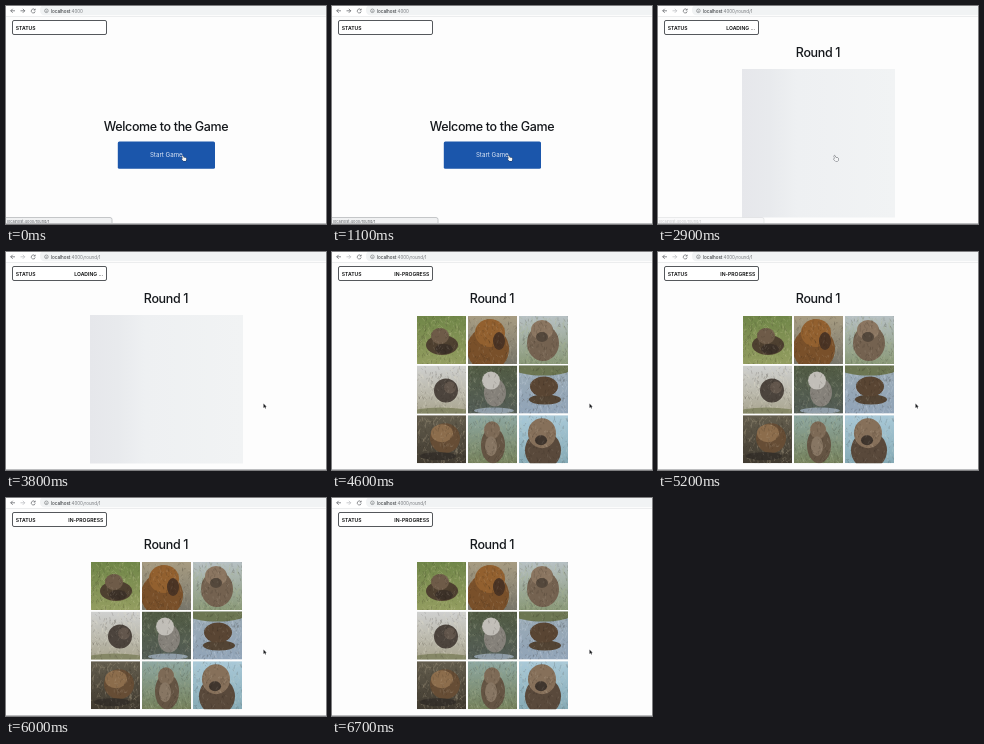
Write an HTML page with a canvas that moves like this. It is 320 px wide and 218 px high and loops after 6.8 s.

```html
<!DOCTYPE html>
<html lang="en">
<head>
<meta charset="utf-8">
<title>Welcome to the Game</title>
<style>
  html, body { margin: 0; width: 100%; height: 100%; overflow: hidden; background: #fdfdfd; }
  canvas { display: block; width: 320px; height: 218px; }
</style>
</head>
<body>
<canvas id="stage"></canvas>
<script>
const W = 320, H = 218, LOOP = 6800;
const PAGE_AT = 2500, PHOTOS_AT = 4600;
const dpr = window.devicePixelRatio || 1;

function scaled(canvas, scale) {
  canvas.width = W * scale;
  canvas.height = H * scale;
  const c = canvas.getContext('2d');
  c.scale(scale, scale);
  return c;
}

const ctx = scaled(document.getElementById('stage'), dpr);

function text(str, x, y, size, color, weight = 400, align = 'left') {
  ctx.font = `${weight} ${size}px Inter, "Liberation Sans", sans-serif`;
  ctx.fillStyle = color;
  ctx.textAlign = align;
  ctx.fillText(str, x, y);
  return ctx.measureText(str).width;
}

function heading(str, y) {
  ctx.letterSpacing = '-0.35px';
  text(str, 160, y, 12.5, '#15181c', 500, 'center');
  ctx.letterSpacing = '0px';
}

function box(x, y, w, h, r, fill, stroke) {
  ctx.beginPath();
  ctx.roundRect(x, y, w, h, r);
  if (fill) { ctx.fillStyle = fill; ctx.fill(); }
  if (stroke) { ctx.strokeStyle = stroke; ctx.lineWidth = 1; ctx.stroke(); }
}

function path(d, color, width = 0.7) {
  ctx.strokeStyle = color;
  ctx.lineWidth = width;
  ctx.stroke(new Path2D(d));
}

// Photo tiles: sky, ground, texture colour, then blobs [color, x, y, rx, ry]
const tiles = [
  { sky: '#708648', ground: '#939d60', blade: '#b4bc84', blobs: [
    ['#4e4030', 25, 29, 16, 10], ['#6e5b48', 23, 20, 9, 8], ['#3c3128', 27, 33, 9, 5]] },
  { sky: '#a79c82', ground: '#77756a', blade: '#a29c88', blobs: [
    ['#79502a', 20, 33, 21, 22], ['#92602f', 22, 17, 15, 14], ['#4b3424', 31, 25, 6, 9]] },
  { sky: '#b7c1c4', ground: '#899877', blade: '#a7b28b', blobs: [
    ['#746250', 24, 27, 16, 18], ['#8b7661', 23, 14, 11, 10], ['#54483c', 23, 21, 6, 5]] },
  { sky: '#cfd0cf', ground: '#a9a58f', blade: '#dad6c9', blobs: [
    ['#858766', 24, 47, 30, 5], ['#4c443d', 29, 25, 12, 12], ['#62564c', 33, 22, 6, 6]] },
  { sky: '#515b43', ground: '#545d57', blade: '#899179', blobs: [
    ['#85817a', 27, 27, 11, 14], ['#c1beb8', 23, 15, 9, 9], ['#8f9da8', 26, 45, 20, 3]] },
  { sky: '#9aaab4', ground: '#91a4b8', blade: '#bdcbd9', blobs: [
    ['#6c7652', 24, 2, 30, 8], ['#534434', 26, 34, 16, 5], ['#594533', 25, 21, 14, 10]] },
  { sky: '#635d4d', ground: '#403a30', blade: '#a69983', blobs: [
    ['#664d35', 28, 23, 15, 15], ['#8c6d4c', 25, 18, 11, 9], ['#35302a', 21, 41, 18, 4]] },
  { sky: '#8ea8a2', ground: '#74805a', blade: '#9eaa87', blobs: [
    ['#645443', 25, 30, 12, 18], ['#7d6a56', 24, 15, 8, 9], ['#877663', 23, 31, 6, 10]] },
  { sky: '#a9c9d8', ground: '#86aab5', blade: '#b5cccb', blobs: [
    ['#59493b', 24, 35, 18, 19], ['#86705a', 23, 18, 14, 15], ['#40362e', 22, 25, 6, 5]] }
];

function rng(seed) {
  return () => (seed = (seed * 16807) % 2147483647) / 2147483647;
}

function drawTile(c, tile, i) {
  const w = 49, h = 48, rand = rng(91 + i * 577);
  const streaks = (n, color, alpha, len) => {
    c.strokeStyle = color;
    c.globalAlpha = alpha;
    c.lineWidth = 0.6;
    for (let k = 0; k < n; k++) {
      const x = rand() * w, y = rand() * h;
      c.beginPath();
      c.moveTo(x, y);
      c.lineTo(x + (rand() - 0.5) * len, y + rand() * len);
      c.stroke();
    }
    c.globalAlpha = 1;
  };
  c.save();
  c.translate(85 + (i % 3) * 51, 64 + Math.floor(i / 3) * 49.6);
  c.beginPath();
  c.rect(0, 0, w, h);
  c.clip();
  const bg = c.createLinearGradient(0, 0, 0, h);
  bg.addColorStop(0, tile.sky);
  bg.addColorStop(1, tile.ground);
  c.fillStyle = bg;
  c.fillRect(0, 0, w, h);
  streaks(110, tile.blade, 0.55, 6);
  for (const [color, x, y, rx, ry] of tile.blobs) {
    c.fillStyle = color;
    c.beginPath();
    c.ellipse(x, y, rx, ry, 0, 0, Math.PI * 2);
    c.fill();
  }
  streaks(120, '#241d18', 0.25, 4);
  streaks(80, '#e5dccb', 0.18, 4);
  c.restore();
}

const photos = document.createElement('canvas');
const photoCtx = scaled(photos, dpr);
tiles.forEach((tile, i) => drawTile(photoCtx, tile, i));

function toolbar(onRound) {
  ctx.fillStyle = '#fff';
  ctx.fillRect(0, 0, W, 10);
  box(34, -1, 300, 10.2, 4.5, '#f1f3f4');
  ctx.fillStyle = '#e6e7e9';
  ctx.fillRect(0, 10, W, 0.7);
  path('M9 4.8H4.7M6.7 2.8L4.7 4.8L6.7 6.8', '#55585c');
  path('M14.5 4.8H18.8M16.8 2.8L18.8 4.8L16.8 6.8', onRound ? '#b5b7ba' : '#55585c');
  path('M28.8 3.7A2 2 0 1 0 29.2 5.4M29.2 2.7V4.1H27.7', '#606367');
  path('M38.6 4.8a1.8 1.8 0 1 0 3.6 0a1.8 1.8 0 1 0 -3.6 0M40.4 4.5V5.8', '#606367', 0.55);
  const w = text('localhost', 45, 6.5, 4.5, '#202327');
  text(onRound ? ':4000/round/1' : ':4000', 45 + w, 6.5, 4.5, '#74777b');
}

function status(label) {
  box(6.5, 14.5, 94, 14, 1.5, '#fff', '#55585c');
  text('STATUS', 9.7, 23.6, 5.1, '#08090a', 600);
  text(label, 97.3, 23.6, 5.1, '#08090a', 600, 'right');
}

function linkHint(alpha) {
  if (alpha <= 0) return;
  ctx.globalAlpha = alpha;
  box(-2, 211.5, 108, 9, 2, '#f0f1f2', '#c4c6c8');
  text('localhost:4000/round/1', 1, 216.5, 3.85, '#606367');
  ctx.globalAlpha = 1;
}

function welcome() {
  heading('Welcome to the Game', 125.3);
  box(111.8, 135.4, 97.2, 27.4, 1.6, '#1b56ab');
  text('Start Game', 160.3, 151.3, 6.2, '#dce6f5', 400, 'center');
}

function skeleton() {
  const g = ctx.createLinearGradient(84, 0, 237, 0);
  g.addColorStop(0, '#e6e7eb');
  g.addColorStop(0.18, '#e8eaed');
  g.addColorStop(0.36, '#eef0f2');
  g.addColorStop(1, '#f1f3f4');
  ctx.fillStyle = g;
  ctx.fillRect(84, 63, 153, 148.5);
}

function pointer(shape, x, y, fill, stroke) {
  ctx.save();
  ctx.translate(x, y);
  const p = new Path2D(shape);
  ctx.lineJoin = 'round';
  ctx.lineWidth = 0.7;
  ctx.strokeStyle = stroke;
  ctx.stroke(p);
  ctx.fillStyle = fill;
  ctx.fill(p);
  ctx.restore();
}

const HAND = 'M0 .4Q.7 -.4 1.2 .5L1.7 2L3.8 2.4Q4.5 2.8 4.3 4L3.8 5.6H1.4L-.4 3.6Q-.3 2.9 .7 3.3Z';
const ARROW = 'M0 0V4.4L1 3.5L1.7 5.1L2.5 4.7L1.8 3.2H3.1Z';

function cursor(t) {
  if (t < 3400) {
    pointer(HAND, 176, 149.4, '#f4f5f6', '#20252c');
    return;
  }
  const step = Math.min(5, Math.floor((t - 3400) / 100) + 1) / 5;
  const p = step * step * (3 - 2 * step);
  pointer(ARROW, 176.5 + 81 * p, 149.8 + 1.7 * p, '#202124', '#fff');
}

function clickRing() {
  ctx.beginPath();
  ctx.arc(176.5, 150.3, 9.8, 0, Math.PI * 2);
  ctx.fillStyle = 'rgba(90, 100, 120, .18)';
  ctx.fill();
  ctx.strokeStyle = 'rgba(125, 126, 118, .75)';
  ctx.lineWidth = 1;
  ctx.setLineDash([1.6, 0.8]);
  ctx.stroke();
  ctx.setLineDash([]);
}

function draw(t) {
  const onRound = t >= PAGE_AT, loaded = t >= PHOTOS_AT;
  ctx.fillStyle = '#fdfdfd';
  ctx.fillRect(0, 0, W, H);
  toolbar(onRound);
  status(loaded ? 'IN-PROGRESS' : onRound ? 'LOADING ...' : '');
  if (onRound) {
    heading('Round 1', 51);
    if (loaded) ctx.drawImage(photos, 0, 0, W, H);
    else skeleton();
  } else {
    welcome();
    if (t >= 2400) clickRing();
  }
  linkHint(t < 2800 ? 1 : 1 - (Math.floor((t - 2800) / 100) + 1) / 3);
  ctx.fillStyle = '#bcbdbf';
  ctx.fillRect(0, H - 1, W, 1);
  cursor(t);
}

function frame() {
  draw(performance.now() % LOOP);
  requestAnimationFrame(frame);
}
frame();
</script>
</body>
</html>
```
